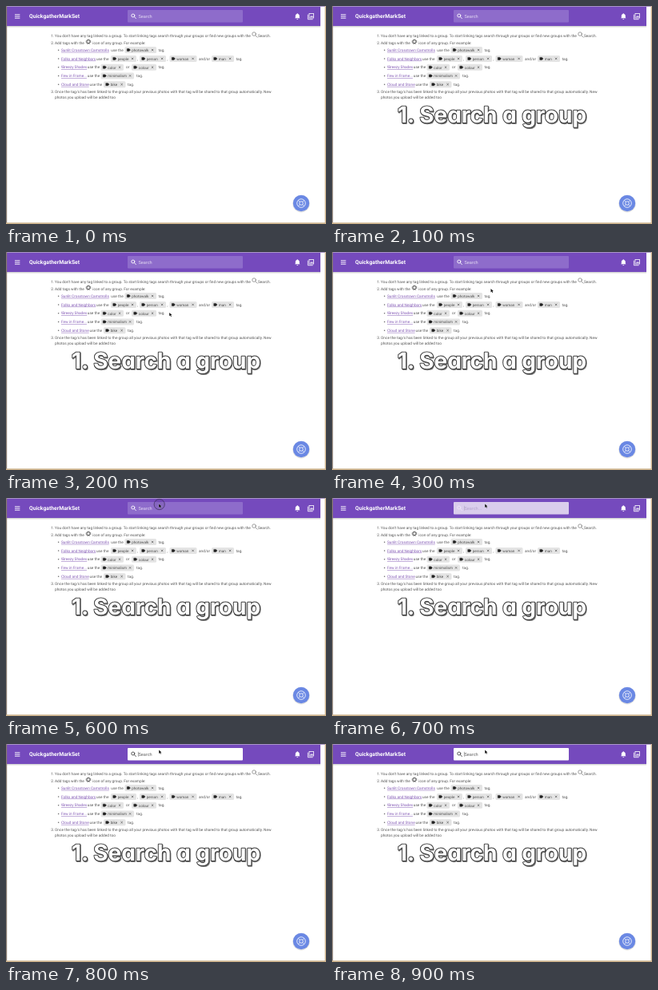
Write an HTML page that moves like this. It is 400x273 px and loops after 1000 ms.

```html
<!DOCTYPE html>
<html lang="en">
<head>
<meta charset="utf-8">
<title>Search a group</title>
<style>
  html, body { margin: 0; width: 100%; height: 100%; overflow: hidden; background: #fff; }
  svg { display: block; width: 100vw; height: 100vh; }
  text { font-family: Roboto, Arial, sans-serif; font-size: 4.76px; fill: #555; text-rendering: geometricPrecision; white-space: pre; }
  .link { fill: #8258b4; text-decoration: underline; }
  .chip { font-size: 4.55px; fill: #4a4a4a; }
  .name { font-size: 6.8px; font-weight: 700; fill: #fff; }
  .field { font-size: 5.6px; }
  .caption text { font: 700 28px Inter, "Open Sans", sans-serif; font-feature-settings: "cv11"; text-anchor: middle; stroke-width: 1.9; stroke-linejoin: round; paint-order: stroke; }
  .caption .face { fill: #fff; stroke: #3a3a3a; }
  .caption .shadow { fill: #777; stroke: #777; }
</style>
</head>
<body>
<svg viewBox="0 0 400 273" preserveAspectRatio="none">
  <defs>
    <linearGradient id="shade" x2="0" y2="1">
      <stop stop-color="#000" stop-opacity=".2"/>
      <stop offset="1" stop-color="#000" stop-opacity="0"/>
    </linearGradient>
    <g id="lens" fill="none" stroke-linecap="round">
      <circle cx="-.8" cy="-.8" r="2"/>
      <path d="M.8 .8L2.8 2.8"/>
    </g>
  </defs>
  <rect width="400" height="273" fill="#fff"/>

  <rect y="25" width="393" height="2.5" fill="url(#shade)"/>
  <rect width="393" height="25" fill="#754abd"/>
  <rect width="400" height="1" fill="#a894c4"/>
  <path d="M11 10.8h6.4M11 13h6.4M11 15.2h6.4" stroke="#fff" stroke-width=".9"/>
  <text class="name" x="29" y="15.3">QuickgatherMarkSet</text>
  <rect id="box" x="152" y="5" width="144" height="15.5" rx="1"/>
  <use id="boxLens" href="#lens" x="159.6" y="12.8" stroke-width=".9"/>
  <text id="hint" class="field" x="165.5" y="14.8">Search</text>
  <path id="caret" d="M165.4 9.8v6" stroke="#555" stroke-width=".5"/>
  <path d="M361 15.3l.8-.9v-2.2c0-3.4 5-3.4 5 0v2.2l.8.9zM363.4 15.9h1.8a.9 .9 0 0 1-1.8 0zM363.7 9.2h1.2v1h-1.2z" fill="#fff"/>
  <g fill="none" stroke="#fff" stroke-width=".8">
    <path d="M377.4 10.6v6.1h6.2"/>
    <rect x="379" y="9.4" width="5.5" height="5.6"/>
    <path d="M380 13.8l1.2-1.5 .8 .9 .9-1.1 1.1 1.7z" fill="#fff" stroke="none"/>
  </g>

  <g id="content"></g>

  <g transform="translate(369 247)">
    <circle cy=".7" r="10.7" fill="#000" opacity=".12"/>
    <circle r="10.2" fill="#6a88e4"/>
    <g fill="none" stroke="#fff" stroke-width=".8">
      <circle r="5.3"/>
      <circle r="2.3"/>
      <path d="M-3.8-3.8l2.2 2.2M3.8-3.8l-2.2 2.2M-3.8 3.8l2.2-2.2M3.8 3.8l-2.2-2.2"/>
    </g>
  </g>

  <g id="caption" class="caption">
    <text class="shadow" x="200.8" y="147">1. Search a group</text>
    <text class="face" x="200" y="146">1. Search a group</text>
  </g>

  <path d="M0 0h1.2v273H0z" fill="#85796f"/>
  <path d="M398.6 0h1.4v273H0v-1.8h398.6z" fill="#cdb28c"/>

  <g id="pointer">
    <circle id="ring" r="6.6" cx=".5" cy=".5" fill="#000" fill-opacity=".05" stroke="#3a2d55" stroke-width=".7"/>
    <path d="M0 0v4.4l1.1-1 .8 1.7 .8-.4-.8-1.6h1.4z" fill="#111" stroke="#fff" stroke-width=".35" paint-order="stroke"/>
  </g>
</svg>
<script>
const NS = "http://www.w3.org/2000/svg";
const el = id => document.getElementById(id);
const content = el("content");

function add(tag, attrs, label) {
  const node = document.createElementNS(NS, tag);
  for (const key in attrs) node.setAttribute(key, attrs[key]);
  if (label) node.textContent = label;
  content.append(node);
}

const write = (x, y, label, cls = "") => add("text", { x, y, class: cls }, label);

function chip(x, y, w, label) {
  add("rect", { x, y: y - 5.7, width: w, height: 8, rx: 1.5, fill: "#e4e4e4" });
  add("path", { d: `M${x + 2.8} ${y - 3.2}h2.7l1.4 1.5-1.4 1.5h-2.7z`, fill: "#222", stroke: "#222", "stroke-width": .5, "stroke-linejoin": "round" });
  write(x + 8.8, y + .1, label, "chip");
  const cx = x + w - 4.9, cy = y - 1.7;
  add("path", { d: `M${cx - 1.2} ${cy - 1.2}l2.4 2.4m0-2.4l-2.4 2.4`, stroke: "#444", "stroke-width": .6 });
}

// Each row: baseline, link, x of "use the", chips [x, width, label], words [x, label]
const rows = [
  [56.8, "Sunlit Crosstown Camstrolls", 131.3, [[148.5, 39.5, "photowalk"]], [[190.5, "tag."]]],
  [67.6, "Folks and Neighbors", 113, [[131, 32, "people"], [167, 33, "person"], [204.5, 34, "woman"], [257, 28, "man"]],
    [[164, ","], [201.5, ","], [241, "and/or"], [287.5, "tag."]]],
  [78.4, "!Breezy Shades", 101.8, [[118.5, 28.5, "color"], [157, 31, "colour"]], [[150, "or"], [190.5, "tag."]]],
  [89.1, "Few in Frame...", 101.8, [[118.5, 41.5, "minimalism"]], [[163, "tag."]]],
  [99.9, "Cloud and Stone", 104.6, [[122, 27.5, "bike"]], [[152, "tag."]]]
];

write(56.3, 38.8, "1.");
write(61, 38.8, "You don't have any tag linked to a group. To start linking tags search through your groups or find new groups with the");
add("use", { href: "#lens", transform: "translate(311 36) scale(1.15)", stroke: "#666", "stroke-width": .55 });
write(315, 38.8, "Search.");
write(56.3, 47.9, "2.");
write(61, 47.9, "Add tags with the");
add("circle", { cx: 103, cy: 44.7, r: 2, fill: "none", stroke: "#555", "stroke-width": 1 });
add("circle", { cx: 103, cy: 44.7, r: 2.9, fill: "none", stroke: "#555", "stroke-width": 1, "stroke-dasharray": "1.14 1.14" });
write(108.3, 47.9, "icon of any group. For example:");
for (const [y, link, useX, chips, words] of rows) {
  add("circle", { cx: 65.6, cy: y - 1.6, r: .75, fill: "#666" });
  write(69, y, link, "link");
  write(useX, y, "use the");
  chips.forEach(([x, w, label]) => chip(x, y, w, label));
  words.forEach(([x, label]) => write(x, y, label));
}
write(56.3, 108.8, "3.");
write(61, 108.8, "Once the tag/s has been linked to the group all your previous photos with that tag will be shared to that group automatically. New");
write(61, 115.9, "photos you upload will be added too");

// Box fill, icon, hint colour, hint text
const looks = {
  idle: ["#8e6ccb", "#fff", "#e2d8f2", "Search"],
  fading: ["#dacdec", "#eee8f7", "#b5a5cf", "Search..."],
  active: ["#fff", "#444", "#666", "Search"]
};

function draw(ms) {
  const step = Math.floor(ms / 100) % 10;
  const look = step < 7 ? "idle" : step === 7 ? "fading" : "active";
  const [fill, icon, ink, label] = looks[look];
  el("box").setAttribute("fill", fill);
  el("boxLens").setAttribute("stroke", icon);
  el("hint").style.fill = ink;
  el("hint").textContent = label;
  el("caret").style.opacity = look === "idle" ? 0 : look === "fading" ? .4 : 1;
  el("caption").style.display = step ? "" : "none";
  el("pointer").style.display = step > 1 ? "" : "none";
  el("ring").style.display = step === 6 ? "" : "none";
  // The pointer slows down as it reaches the search box
  const left = Math.max(0, (6 - step) / 3) ** 2;
  el("pointer").setAttribute("transform", `translate(${191.2 + 7.3 * left} ${7.5 + 38.5 * left})`);
}

const start = performance.now();
function tick() {
  draw((performance.now() - start) % 1000);
  requestAnimationFrame(tick);
}
tick();
</script>
</body>
</html>
```
